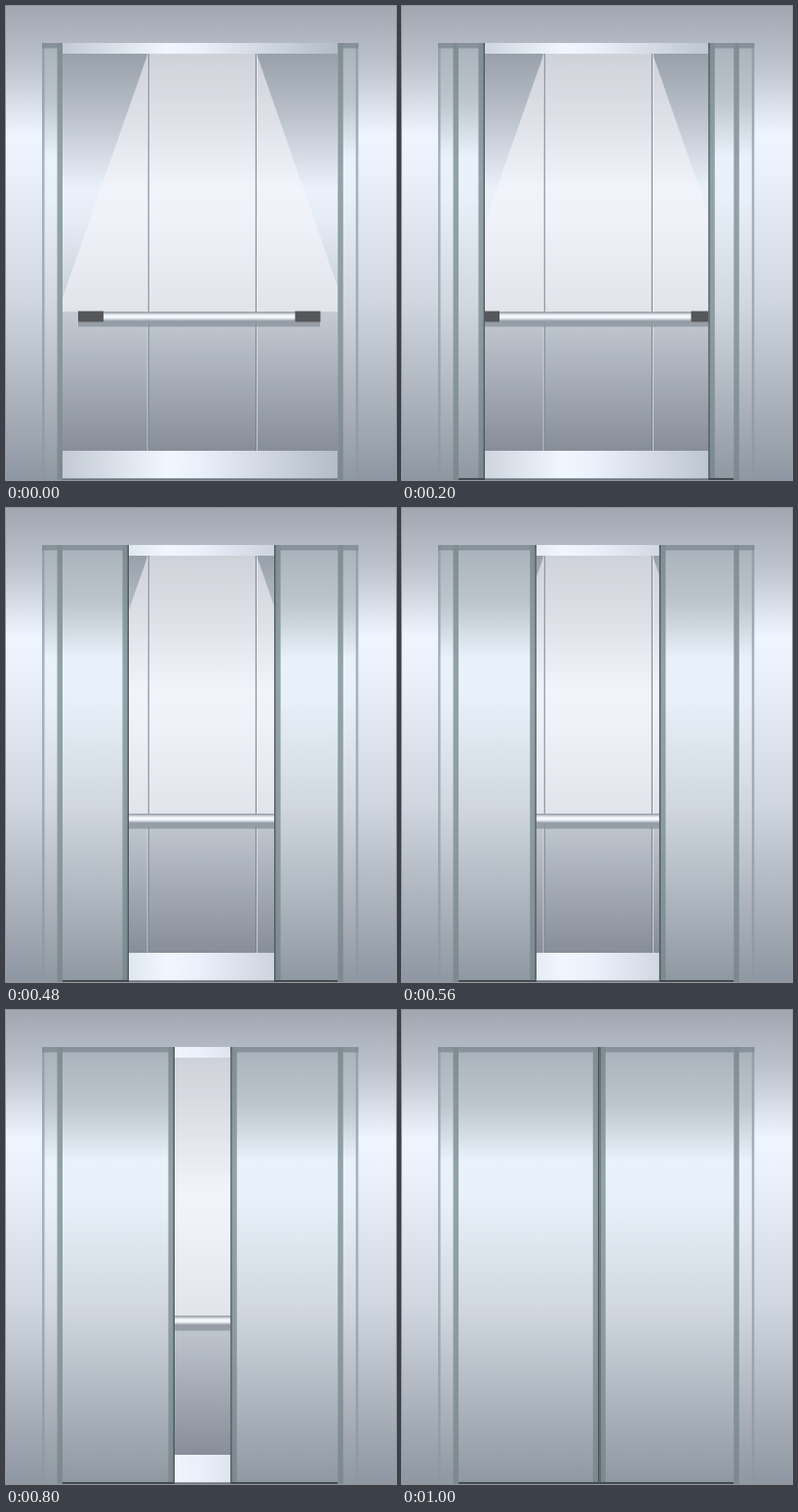
An HTML page that plays this animation: 400 px wide and 487 px high, repeating every 1.2 s.

```html
<!DOCTYPE html>
<html lang="en">
<head>
<meta charset="utf-8">
<title>Lift doors</title>
<style>
html, body { margin: 0; height: 100%; overflow: hidden; }
svg { display: block; width: 100%; height: 100%; }
</style>
</head>
<body>
<svg viewBox="0 0 400 487" preserveAspectRatio="none">
  <defs>
    <linearGradient id="wall" gradientUnits="userSpaceOnUse" x1="0" y1="0" x2="0" y2="487">
      <stop offset="0" stop-color="#a0a7b1"/>
      <stop offset=".13" stop-color="#bec5ce"/>
      <stop offset=".27" stop-color="#eef5fe"/>
      <stop offset=".35" stop-color="#eaf1fa"/>
      <stop offset=".62" stop-color="#d0d7e0"/>
      <stop offset="1" stop-color="#8e96a1"/>
    </linearGradient>
    <linearGradient id="panel" gradientUnits="userSpaceOnUse" x1="0" y1="38" x2="0" y2="487">
      <stop offset="0" stop-color="#a9b2ba"/>
      <stop offset=".13" stop-color="#bcc4cc"/>
      <stop offset=".26" stop-color="#e9f1fa"/>
      <stop offset=".35" stop-color="#e8f0f9"/>
      <stop offset=".6" stop-color="#d0d7df"/>
      <stop offset="1" stop-color="#8f97a1"/>
    </linearGradient>
    <linearGradient id="cabin" gradientUnits="userSpaceOnUse" x1="0" y1="49" x2="0" y2="457">
      <stop offset="0" stop-color="#98a0aa"/>
      <stop offset=".13" stop-color="#b4bbc4"/>
      <stop offset=".34" stop-color="#ebf1fa"/>
      <stop offset=".42" stop-color="#e6ecf5"/>
      <stop offset=".65" stop-color="#c5cbd3"/>
      <stop offset="1" stop-color="#878e99"/>
    </linearGradient>
    <linearGradient id="bar">
      <stop offset="0" stop-color="#c3cad3"/>
      <stop offset=".38" stop-color="#f1f7ff"/>
      <stop offset=".5" stop-color="#eaf0f9"/>
      <stop offset="1" stop-color="#b4bcc7"/>
    </linearGradient>
    <linearGradient id="rail" x2="0" y2="1">
      <stop offset="0" stop-color="#8d959d"/>
      <stop offset=".4" stop-color="#f8fbff"/>
      <stop offset=".65" stop-color="#eef3fa"/>
      <stop offset="1" stop-color="#8d959e"/>
    </linearGradient>
    <linearGradient id="strip" x2="0" y2="1">
      <stop offset="0" stop-color="#7f8c92"/>
      <stop offset=".3" stop-color="#93a3a8"/>
      <stop offset=".65" stop-color="#8b9b9f"/>
      <stop offset="1" stop-color="#7b898e"/>
    </linearGradient>
    <clipPath id="opening"><rect x="58" y="38" width="282" height="449"/></clipPath>
    <g id="door">
      <rect x="-150" y="38" width="150" height="447" fill="url(#panel)"/>
      <rect x="-150" y="38" width="150" height="5.5" fill="#7d878f" opacity=".75"/>
      <rect x="-6.5" y="38" width="5.5" height="447" fill="url(#strip)"/>
      <rect x="-1.3" y="38" width="1.3" height="447" fill="#46545a"/>
      <rect x="-150" y="485" width="150" height="2" fill="#424a52"/>
    </g>
    <g id="jamb">
      <rect x="37" y="38" width="21" height="449" fill="url(#panel)"/>
      <rect x="37" y="38" width="2.5" height="449" fill="#8d98a2" opacity=".7"/>
      <rect x="37" y="38" width="21" height="5.5" fill="#7d878f" opacity=".75"/>
      <rect x="52.5" y="38" width="5.5" height="449" fill="url(#strip)"/>
    </g>
    <g id="seam">
      <path d="M145.2 49V457" stroke="#eef2f6" opacity=".7"/>
      <path d="M146.2 49V457" stroke="#77808a"/>
    </g>
  </defs>

  <rect width="400" height="487" fill="url(#wall)"/>
  <g clip-path="url(#opening)">
    <rect x="58" y="49" width="282" height="408" fill="url(#cabin)"/>
    <path d="M145.5 49H257L349 314H53Z" fill="#f6f7fb" opacity=".58"/>
    <use href="#seam"/>
    <use href="#seam" transform="matrix(-1 0 0 1 402.6 0)"/>
    <rect x="58" y="38" width="282" height="11" fill="url(#bar)"/>
    <rect x="58" y="457" width="282" height="28.5" fill="url(#bar)"/>
    <rect x="58" y="485.5" width="282" height="1.5" fill="#6b747d"/>
    <rect x="74" y="324" width="248" height="5.5" fill="#8f979f" opacity=".85"/>
    <rect x="74" y="314" width="248" height="10" fill="url(#rail)"/>
    <path d="M74 313.5h26v11h-26zM296.5 313.5h26v11h-26z" fill="#56575a"/>
    <use id="left" href="#door"/>
    <use id="right" href="#door"/>
  </g>
  <use href="#jamb"/>
  <use href="#jamb" transform="matrix(-1 0 0 1 398.3 0)"/>
</svg>
<script>
const LOOP = 1200, STEP = 40, STEPS = 25, MEET = 202.3;
const left = document.getElementById('left');
const right = document.getElementById('right');
const start = performance.now();

function draw(now) {
  const t = Math.max(0, now - start) % LOOP;
  const remaining = STEPS - Math.min(STEPS, Math.floor(t / STEP));
  left.setAttribute('transform', `translate(${MEET - 5.87 * remaining} 0)`);
  right.setAttribute('transform', `matrix(-1 0 0 1 ${MEET + 5.6 * remaining} 0)`);
  requestAnimationFrame(draw);
}
draw(start);
</script>
</body>
</html>
```
